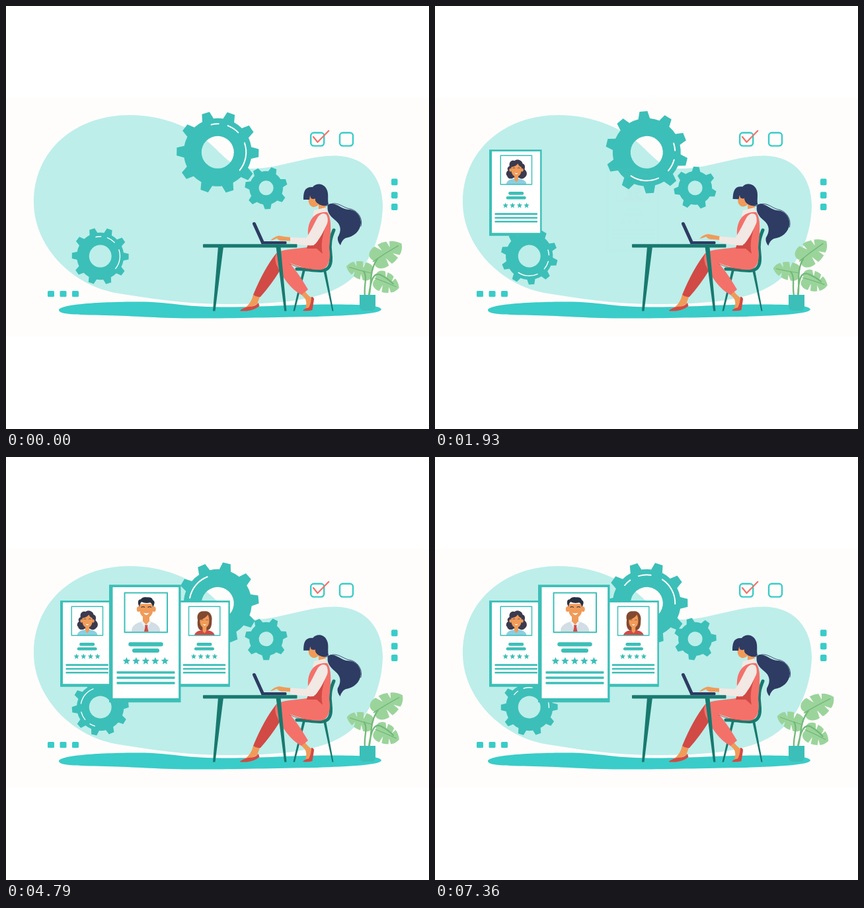
Write an HTML page with a canvas that moves like this. It is 640 px wide and 640 px high and loops after 7.43 s.

```html
<!DOCTYPE html>
<html lang="en">
<head>
<meta charset="utf-8">
<title>Choosing a candidate</title>
<style>
html, body { margin: 0; width: 100%; height: 100%; overflow: hidden; background: #fff; }
canvas { display: block; width: 640px; height: 640px; }
</style>
</head>
<body>
<canvas id="stage" width="640" height="640"></canvas>
<script>
const ctx = document.getElementById('stage').getContext('2d');
const layer = document.createElement('canvas');
layer.width = layer.height = 640;
const lctx = layer.getContext('2d');

const LOOP = 7430, STEP = LOOP / 104, TAU = Math.PI * 2, RAD = Math.PI / 180;
const GEAR = '#3cbfb8', AQUA = '#3accc8', DARK = '#18796f', NAVY = '#2e3b63';
const SKIN = '#f09b59', CORAL = '#f4716a', RED = '#d14a45', SHIRT = '#f2e8e4';
const LEAF = '#9bd49b', STEM = '#73b97a';

function fill(c, color, d) {
  c.fillStyle = color;
  c.fill(new Path2D(d));
}

function line(c, color, width, d, cap = 'round') {
  c.strokeStyle = color;
  c.lineWidth = width;
  c.lineCap = cap;
  c.lineJoin = 'round';
  c.stroke(new Path2D(d));
}

function box(c, color, x, y, w, h, r = 0) {
  c.fillStyle = color;
  c.beginPath();
  c.roundRect(x, y, w, h, r);
  c.fill();
}

function oval(c, color, x, y, rx, ry = rx) {
  c.fillStyle = color;
  c.beginPath();
  c.ellipse(x, y, rx, ry, 0, 0, TAU);
  c.fill();
}

function turned(x, y, angle, draw) {
  ctx.save();
  ctx.translate(x, y);
  ctx.rotate(angle);
  ctx.translate(-x, -y);
  draw();
  ctx.restore();
}

// Gear ring with tapered teeth and optional white shine arcs.
function gear(x, y, scale, angle, o) {
  ctx.save();
  ctx.translate(x, y);
  ctx.rotate(angle);
  ctx.scale(scale, scale);
  ctx.fillStyle = GEAR;
  ctx.beginPath();
  for (let i = 0; i < o.teeth; i++) {
    const a = i * TAU / o.teeth + o.start * RAD;
    const put = (r, s) => {
      const px = r * Math.cos(a) - s * Math.sin(a);
      const py = r * Math.sin(a) + s * Math.cos(a);
      ctx.lineTo(px, py);
    };
    put(o.body - 1.5, -o.foot);
    put(o.tip, -o.head);
    put(o.tip, o.head);
    put(o.body - 1.5, o.foot);
    const next = a + TAU / o.teeth, gap = Math.asin(o.foot / o.body);
    ctx.arc(0, 0, o.body, a + gap, next - gap);
  }
  ctx.closePath();
  ctx.moveTo(o.hole, 0);
  ctx.arc(0, 0, o.hole, 0, TAU, true);
  ctx.fill('evenodd');
  ctx.strokeStyle = '#fff';
  ctx.lineWidth = 2;
  ctx.lineCap = 'round';
  for (const [from, to] of o.shine) {
    ctx.beginPath();
    ctx.arc(0, 0, 43, from * RAD, to * RAD);
    ctx.stroke();
  }
  ctx.restore();
}

const LARGE = { teeth: 10, start: 1, body: 51.5, tip: 62, head: 6, foot: 9, hole: 24.5,
  shine: [[-103, -88], [-69, -44], [-19, 39]] };
const SMALL = { teeth: 7, start: -17, body: 25.5, tip: 32, head: 4.2, foot: 6.5, hole: 11, shine: [] };

function star(c, x, y, r) {
  c.beginPath();
  for (let i = 0; i < 10; i++) {
    const a = i * Math.PI / 5 - Math.PI / 2, q = i % 2 ? r * 0.45 : r;
    c.lineTo(x + q * Math.cos(a), y + q * Math.sin(a));
  }
  c.closePath();
  c.fill();
}

function smile(c, x, y, w) {
  fill(c, '#fff', `M${x - w} ${y}Q${x} ${y + 1.6} ${x + w} ${y}Q${x} ${y + w * 1.6} ${x - w} ${y}Z`);
}

function curlyWoman(c) {
  const hair = '#3b3a4e';
  fill(c, hair, 'M42 34C40 24 48 21 52 23C58 18 68 22 69 29C75 30 74 38 73 41C79 46 79 53 74 57C70 62 63 60 61 58L50 58C46 62 38 60 37 54C33 51 36 45 39 43C36 39 39 35 42 34Z');
  fill(c, '#8ccfe0', 'M35 72C36 62 47 61 51 60L61 60C67 62 76 62 77 72Z');
  fill(c, SKIN, 'M52 50H60V60Q61 62 56 67Q51 62 52 60Z');
  oval(c, SKIN, 44, 42, 2.6, 3.5);
  oval(c, SKIN, 68, 42, 2.6, 3.5);
  fill(c, SKIN, 'M45.5 36Q55 35 59 29Q62 35 66.500 36V44Q65 55 56 56Q47 55 45.500 44Z');
  line(c, hair, 1, 'M49 38Q51 36.500 53 38M59 38Q61 36.500 63 38');
  smile(c, 56, 48, 3.6);
}

function brownWoman(c) {
  fill(c, '#82492f', 'M42 40C39 29 45 21 55 22C67 20 73 31 71 42C71 52 69 59 63 61H47C41 57 41 47 42 40Z');
  fill(c, RED, 'M35 72C36 64 45 62 51 61L61 61C67 62 76 64 77 72Z');
  fill(c, SKIN, 'M52 52H60V61Q60 64 56 67Q52 64 52 61Z');
  fill(c, SKIN, 'M46.5 40Q58 37 63 29Q66 35 65.500 45Q64 55 56 56.500Q48 55 46.500 45Z');
  line(c, '#82492f', 1, 'M49 40Q51 38.500 53 40M59 40Q61 38.500 63 40');
  smile(c, 56, 48.500, 3.6);
}

function man(c) {
  const hair = '#28303f';
  fill(c, '#d2dde5', 'M34 71C34 60 43 58 51 55H61C68 58 77 60 77.500 71Z');
  fill(c, SKIN, 'M51 46H61V55L56 61L51 55Z');
  fill(c, '#eaf0f4', 'M50 54L56 61L53 64L48 56ZM62 54L56 61L59 64L64 56Z');
  fill(c, RED, 'M54 61H58.500L58 64L59.500 71H53L54.500 64Z');
  oval(c, SKIN, 44.5, 37, 2.7, 4);
  oval(c, SKIN, 68, 37, 2.7, 4);
  fill(c, SKIN, 'M46 29H66.500V39Q65 49 56.300 51Q47.500 49 46 39Z');
  fill(c, hair, 'M46 34L44 29Q43 22 48 22Q51 18 57 19Q65 18 66 23Q70 25 68 30L66.500 34Q65 28 62 27Q55 29 49 26Q46 29 46 34Z');
  line(c, hair, 1.1, 'M49 34Q51 32.500 53.500 34M59 34Q61 32.500 63.500 34');
  smile(c, 56.3, 42.500, 4.3);
}

// Card coordinates are those of the large one: 108.5 by 178.
function card(o, shown) {
  if (shown <= 0) return;
  const c = lctx;
  c.clearRect(0, 0, 640, 640);
  c.save();
  c.translate(o.x, o.y + 25 * (1 - shown));
  c.scale(o.scale, o.scale);
  box(c, GEAR, 0, 0, 108.5, 178);
  box(c, '#fff', 5.5, 3.7, 99.7, 168);
  o.face(c);
  c.strokeStyle = GEAR;
  c.lineWidth = 2;
  c.strokeRect(23.5, 12.3, 64.5, 59.7);
  box(c, GEAR, 55.5 - o.bar / 2, 87, o.bar, 6.3, 3);
  box(c, GEAR, 35, 96.4, 41, 6.2, 3);
  for (let i = 0; i < o.stars; i++) star(c, 55.4 + (i - (o.stars - 1) / 2) * 14.5, 115.5, 6);
  for (let i = 0; i < 3; i++) box(c, GEAR, 11.5, 131 + i * 8, 88, 3.5, 1);
  c.restore();
  ctx.globalAlpha = shown;
  ctx.drawImage(layer, 0, 0);
  ctx.globalAlpha = 1;
}

const CARDS = [
  { x: 82, y: 217.3, scale: 0.733, start: 5, bar: 31.5, stars: 4, face: curlyWoman },
  { x: 259.3, y: 217.3, scale: 0.733, start: 26.3, bar: 31.5, stars: 4, face: brownWoman },
  { x: 156, y: 193.3, scale: 1, start: 48, bar: 52.5, stars: 5, face: man }
];

function ease(p) {
  p = Math.min(1, Math.max(0, p));
  return (1 - Math.cos(Math.PI * p)) / 2;
}

function backdrop() {
  ctx.fillStyle = '#fff';
  ctx.fillRect(0, 0, 640, 640);
  ctx.fillStyle = '#fefdfc';
  ctx.fillRect(0, 139, 640, 361);
  fill(ctx, '#bdeeea', 'M42 297C42 218 105 165 187 165C240 165 280 185 305 205C328 224 340 246 372 246C415 246 455 226 500 226.500C545 228 570 260 570 303C569 345 552 390 520 415C480 447 410 451 330 451C270 451 215 442 165 434C95 420 42 360 42 297Z');
  for (const y of [261.3, 281.3, 299]) box(ctx, AQUA, 583, y, 9.5, 10, 2);
  for (const x of [63, 81.5, 100]) box(ctx, AQUA, x, 431, 10, 9, 1.5);
  ctx.strokeStyle = AQUA;
  ctx.lineWidth = 2.4;
  for (const x of [461.2, 505]) {
    ctx.beginPath();
    ctx.roundRect(x, 191.8, 20, 19.8, 4.5);
    ctx.stroke();
  }
  line(ctx, CORAL, 2.2, 'M465 198L471.500 206L488.300 188.800');
}

function floor() {
  fill(ctx, AQUA, 'M80 460C81 452 135 447.500 200 447.500C250 447.500 262 455 325 455.500C390 456 420 451.500 490 451.500C540 451.500 566 453 568 459C566 466 520 468 470 470C400 471 330 473 280 472.500C220 472 200 469 150 468C105 467 80 467 80 460Z');
}

function leaf(x, y, angle, sx, sy) {
  ctx.save();
  ctx.translate(x, y);
  ctx.rotate(angle * RAD);
  ctx.scale(sx, sy);
  fill(ctx, LEAF, 'M2 0C-5 -9 2 -18 13 -18L19 -7L18 -18Q25 -18 31 -15L31 -5L35 -13Q43 -9 48 0Q44 10 37 13L30 5L33 15Q26 18 21 18L18 6L16 18C4 19 -5 10 2 0Z');
  line(ctx, STEM, 1.5, 'M0 0Q20 -1 42 0');
  ctx.restore();
}

function plant(sway) {
  turned(547, 437, sway * 0.155, () => {
    leaf(551, 386, -37, 1.06, 1);
    leaf(551, 404, 190, 0.84, 0.76);
    leaf(556, 411, 17, 0.82, 0.86);
    line(ctx, STEM, 2.3, 'M549.500 438C552 420 546 400 557 382M543 438C540 423 545 410 538 402M549 438C550 414 553 400 566 406Q576 410 584 417');
  });
  fill(ctx, GEAR, 'M535 437H559V455Q558 461 552 461H542Q536 461 535 455Z');
}

function chair() {
  fill(ctx, DARK, 'M449 399H453L437 461.500H434.500ZM480 399H484L495.500 461.500H493.500Z');
  line(ctx, DARK, 5, 'M496 339C491 351 489 360 491 374C493 390 490 400 477 400.500C463 401 452 397 440 398');
}

function legs() {
  fill(ctx, SKIN, 'M374 437L384 440L380 451L366 458L362 456Q371 450 374 437Z');
  fill(ctx, RED, 'M354 460.500Q360 456 367 455Q377 455 382 449L383.500 454Q376 460 364 461.500H355Z');
  fill(ctx, RED, 'M409 374L420 377L414 401Q401 422 385 440Q379 441 374 437Q390 398 409 374Z');
  fill(ctx, SKIN, 'M444 434L451 429Q455 437 463 442L461 458H453Q456 447 452 442Z');
  fill(ctx, RED, 'M449 461Q452 457 458 456.500Q462 449 462 440Q466 440 466 444L463.500 460Q458 462 449 461Z');
  fill(ctx, CORAL, 'M410 373C425 366 445 368 460 364L488 361C492 377 491 397 476 399C458 400 442 393 429 389C441 402 449 416 457 429L447 437C430 428 418 410 409 391Q405 379 410 373Z');
  line(ctx, RED, 1, 'M429 390Q444 397 462 398');
}

function head(nod) {
  turned(482, 310, nod * 0.04, () => {
    fill(ctx, SKIN, 'M473 297L484 300L483 308H473Z');
    fill(ctx, SKIN, 'M457 288H475V299Q469 305 464 304Q459 302 458 297Z');
    fill(ctx, NAVY, 'M487 301C497 294 507 308 518 308C530 308 537 318 537 328C536 341 526 349 514 351Q508 354 506 362Q501 356 502 350C508 340 507 331 498 324C489 317 485 310 487 301Z');
    line(ctx, NAVY, 0.9, 'M488 301C502 294 510 306 521 307C533 310 540 322 537 333');
    fill(ctx, NAVY, 'M450 293C450 281 452 273 464 274C469 267 481 268 485 277C489 284 486 294 488 300Q482 304 474 300Q467 297 468 291Q465 293 461.500 291L460 287L459 293Z');
    line(ctx, NAVY, 1, 'M468 292Q471 303 487 302');
  });
}

function woman(nod) {
  head(nod);
  fill(ctx, SHIRT, 'M466 309L483 305L487 314L469 320L464 317Z');
  fill(ctx, CORAL, 'M457 347C456 333 460 321 470 315Q479 311 486 312C494 323 491 345 489 368L455 366Q459 355 457 347Z');
  fill(ctx, RED, 'M485 327C481 343 475 357 479 375L470 367H455L457 361L466 358Z');
  turned(462, 356, nod * 0.06, () => {
    fill(ctx, SKIN, 'M431 350Q421 349 413 347.500Q405 349 400 355Q405 354 410 351.500Q413 356 420 355L431 355.500Z');
    fill(ctx, SHIRT, 'M430 350L456 351L468 356L466 362Q453 363 430 359Z');
  });
  fill(ctx, SHIRT, 'M454 351C461 342 466 329 472 319Q479 311 485 316Q488 322 486 329C480 342 475 352 468 360Q461 364 455 361Z');
}

function desk() {
  fill(ctx, DARK, 'M321 364H329L316.500 461.500H313ZM408.500 364H415.500L424.500 461.500H421.200Z');
  box(ctx, DARK, 298, 360.2, 142.500, 5.300, 1);
  line(ctx, NAVY, 5, 'M375.500 329.500L388 357');
  box(ctx, NAVY, 386, 356, 38.500, 4.300, 1.5);
}

function draw(ms) {
  const n = Math.min(103, Math.floor((ms % LOOP + 5) / STEP));
  const spin = n * 3.13 * RAD;
  const sway = ((1 + Math.cos(TAU * (n - 5.5) / 33)) / 2) ** 2;
  const nod = (1 - Math.cos(TAU * n / 11.45)) / 2;

  backdrop();
  gear(320.3, 221.3, 1, spin, LARGE);
  gear(142.7, 378.5, 0.692, spin, LARGE);
  gear(393.6, 275.3, 1, spin, SMALL);
  floor();
  for (const o of CARDS) card(o, ease((n - o.start) / 12));
  chair();
  legs();
  woman(nod);
  desk();
  // The hand rests over the edge of the keyboard.
  plant(sway);
}

const began = performance.now();
function tick() {
  draw(performance.now() - began);
  requestAnimationFrame(tick);
}
tick();
</script>
</body>
</html>
```
